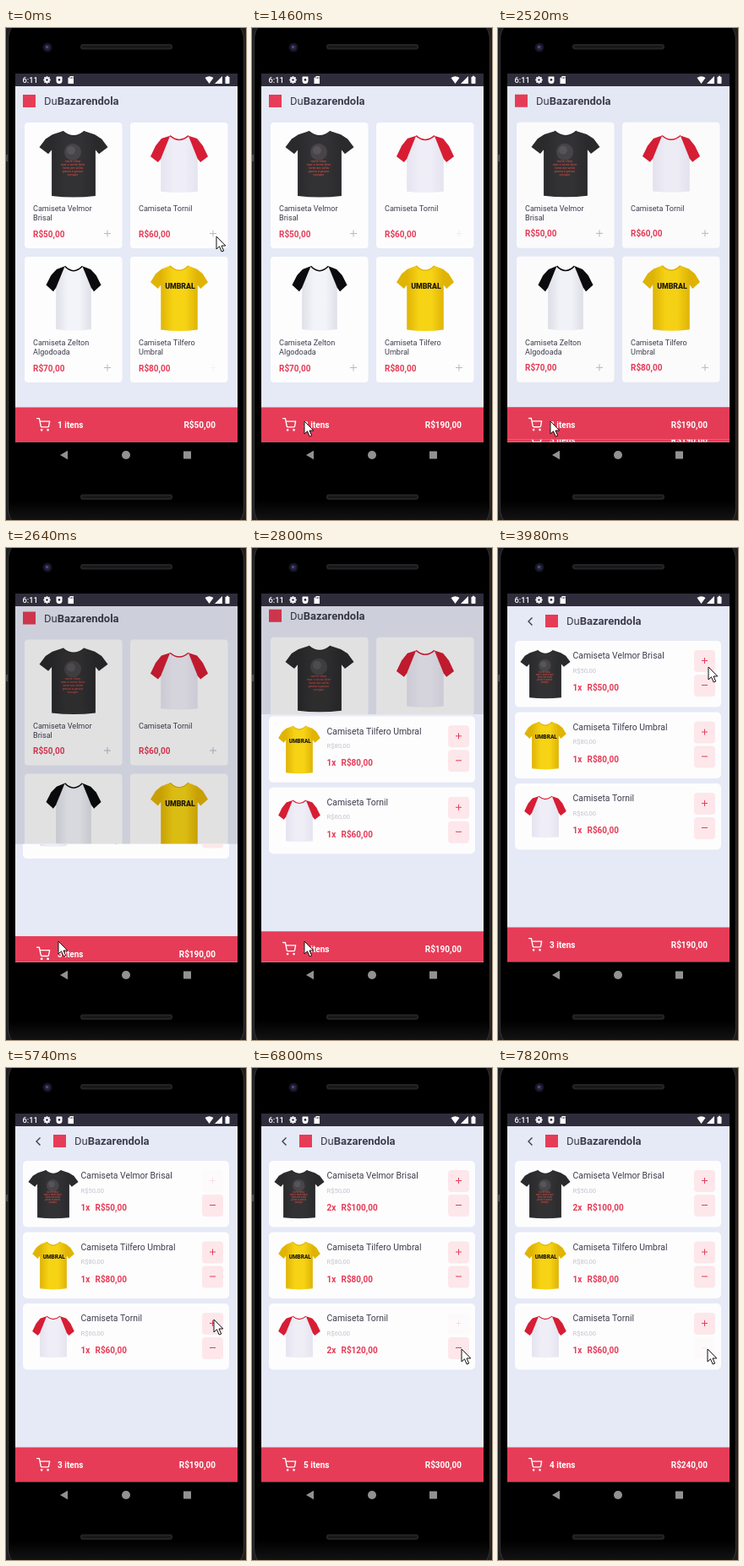
An HTML page with a canvas that plays this animation: 284x583 px, repeating every 8 s.

```html
<!DOCTYPE html>
<html lang="pt-BR">
<head>
<meta charset="utf-8">
<title>Loja</title>
<style>
html, body { margin: 0; width: 100%; height: 100%; overflow: hidden; background: #000; }
canvas { display: block; width: 284px; height: 583px; }
</style>
</head>
<body>
<canvas id="stage"></canvas>
<script>
const W = 284, H = 583, LOOP = 8000;
const STEP = 132.7; // the phone screen is refreshed at this pace
const RED = '#e63c57', INK = '#3d3d4d', BG = '#e6e9f6', CARD = '#fdfdfe';
const SCREEN = { x: 11, y: 54, w: 263, h: 436.5 };
const BRAND = ['Du', 'Bazarendola'];

const PRODUCTS = [
  { lines: ['Camiseta Velmor', 'Brisal'], price: 50,
    look: { w: 81, h: 79, drop: .25, body: '#323234', shade: '#2a2a2c', print: globePrint } },
  { lines: ['Camiseta Tornil'], price: 60,
    look: { w: 68, h: 68, drop: .37, body: '#efeef7', shade: '#e4e3ef', sleeve: '#d71d33' } },
  { lines: ['Camiseta Zelton', 'Algodoada'], price: 70,
    look: { w: 65, h: 77, drop: .3, body: '#f3f4f9', shade: '#dfe0e8', sleeve: '#0b0b0d' } },
  { lines: ['Camiseta Tilfero', 'Umbral'], price: 80,
    look: { w: 68, h: 78, drop: .26, body: '#f6d314', shade: '#e0b406', print: wordPrint } }
];
const ROWS = [0, 3, 1];

// Button presses: fades at "down", takes effect at "apply", recovers at "up"
const TAPS = [
  { id: 3, add: 1, down: -400, apply: 130, up: 60 },
  { id: 1, add: 1, down: 300, apply: 1180, up: 1440 },
  { id: 0, add: 1, down: 4900, apply: 5830, up: 6000 },
  { id: 1, add: 1, down: 6260, apply: 6500, up: 6900 },
  { id: 1, add: -1, down: 7600, apply: 7690, up: LOOP }
];
const HOME = { x: 249, y: 247 };
const MOVES = [
  { from: 500, to: 1300, x: 62, y: 466 },
  { from: 3300, to: 3870, x: 249, y: 141 },
  { from: 4230, to: 4500, x: 246, y: 298 },
  { from: 6100, to: 6420, x: 248, y: 333 }
];

const canvas = document.getElementById('stage');
const ctx = canvas.getContext('2d');
const dpr = window.devicePixelRatio || 1;
canvas.width = W * dpr;
canvas.height = H * dpr;

const mix = (a, b, u) => a + (b - a) * u;
const ramp = (t, a, b) => Math.min(1, Math.max(0, (t - a) / (b - a)));
const smooth = u => u * u * (3 - 2 * u);
const money = n => `R$${n},00`;

const quantity = (id, t) => TAPS.reduce(
  (n, tap) => n + (tap.id === id && t >= tap.apply ? tap.add : 0), id === 0 ? 1 : 0);
const alphaOf = (id, add, t) => TAPS
  .filter(tap => tap.id === id && tap.add === add)
  .reduce((a, { down, up }) => a * (1 - .88 * ramp(t, down, down + 150) * (1 - ramp(t, up, up + 250))), 1);

function box(x, y, w, h, r, fill) {
  ctx.fillStyle = fill;
  ctx.beginPath();
  ctx.roundRect(x, y, w, h, r);
  ctx.fill();
}
function disc(x, y, r, fill) {
  ctx.fillStyle = fill;
  ctx.beginPath();
  ctx.arc(x, y, r, 0, Math.PI * 2);
  ctx.fill();
}
function poly(points, fill) {
  ctx.beginPath();
  points.forEach(([x, y]) => ctx.lineTo(x, y));
  ctx.closePath();
  ctx.fillStyle = fill;
  ctx.fill();
}
function text(str, x, y, size, color, weight = 400, align = 'left') {
  ctx.font = `${weight} ${size}px Roboto, sans-serif`;
  ctx.fillStyle = color;
  ctx.textAlign = align;
  ctx.fillText(str, x, y);
  return ctx.measureText(str).width;
}
function moved(x, y, scale, draw) {
  ctx.save();
  ctx.translate(x, y);
  ctx.scale(scale, scale);
  draw();
  ctx.restore();
}
function faded(alpha, draw) {
  ctx.save();
  ctx.globalAlpha *= alpha;
  draw();
  ctx.restore();
}
function sign(x, y, r, color, plus) {
  ctx.strokeStyle = color;
  ctx.lineWidth = 1;
  ctx.beginPath();
  ctx.moveTo(x - r, y);
  ctx.lineTo(x + r, y);
  if (plus) { ctx.moveTo(x, y - r); ctx.lineTo(x, y + r); }
  ctx.stroke();
}

// T-shirt centred on the origin; "drop" is how far down the sleeves reach
function shirt({ w, h, drop, body, shade, sleeve, print }) {
  const arm = .18;
  const p = (u, v) => [(u - .5) * w, (v - .5) * h];
  const side = f => [
    p(f(.34), .01), p(f(.19), .06), p(f(.09), drop * .5), p(f(0), drop),
    p(f(.13), drop + .1), p(f(arm), drop + .04)
  ];
  const left = side(u => u), right = side(u => 1 - u);
  const fill = ctx.createLinearGradient(-w / 2, 0, w / 2, 0);
  [shade, body, body, shade].forEach((c, i) => fill.addColorStop(mix(arm, 1 - arm, i / 3), c));

  ctx.beginPath();
  left.forEach(q => ctx.lineTo(...q));
  ctx.lineTo(...p(arm, .98));
  ctx.quadraticCurveTo(...p(.5, 1.02), ...p(1 - arm, .98));
  [...right].reverse().forEach(q => ctx.lineTo(...q));
  ctx.quadraticCurveTo(...p(.5, .15), ...left[0]);
  ctx.fillStyle = fill;
  ctx.fill();

  if (sleeve) [left, right].forEach(s => poly(s, sleeve));
  ctx.strokeStyle = sleeve || shade;
  ctx.lineWidth = 1.5;
  ctx.beginPath();
  ctx.moveTo(...left[0]);
  ctx.quadraticCurveTo(...p(.5, .15), ...right[0]);
  ctx.stroke();
  if (print) print();
}
function globePrint() {
  disc(-1, -14, 10, '#474548');
  disc(-3, -16, 5, '#57545a');
  ['norte claro', 'mar e vento livre', 'terra em volta', 'passo a passo', 'sempre'].forEach((line, i) =>
    text(line, -1, -2 + i * 4, 3.8, '#b8453f', 700, 'center'));
}
function wordPrint() {
  text('UMBRAL', 1, -11, 8.8, '#1d1a10', 900, 'center');
}

function header(x) {
  box(x, 79, 15, 15, 0, RED);
  const w = text(BRAND[0], x + 25, 91, 13, INK);
  text(BRAND[1], x + 25 + w, 91, 13, INK, 700);
}

const trolley = new Path2D('M1 1h4l2.7 13.4a2 2 0 0 0 2 1.6h9.7a2 2 0 0 0 2-1.6L23 6H6M10 21a1 1 0 1 1-2 0a1 1 0 1 1 2 0M21 21a1 1 0 1 1-2 0a1 1 0 1 1 2 0');

function cartBar(t) {
  let count = 0, total = 0;
  PRODUCTS.forEach(({ price }, id) => {
    count += quantity(id, t);
    total += quantity(id, t) * price;
  });
  box(11, 449.5, 263, 60, 0, RED);
  moved(36, 462, .68, () => {
    ctx.strokeStyle = '#fff';
    ctx.lineWidth = 2;
    ctx.lineCap = ctx.lineJoin = 'round';
    ctx.stroke(trolley);
  });
  text(`${count} itens`, 61, 474, 10, '#fff', 700);
  text(money(total), 248, 474, 10, '#fff', 700, 'right');
}

function shopScreen(t) {
  box(11, 54, 263, 460, 0, BG);
  header(20);
  PRODUCTS.forEach(({ lines, price, look }, id) => {
    const x = 22 + id % 2 * 125, y = 112 + (id >> 1) * 159;
    box(x, y, 115.5, 149, 4, CARD);
    moved(x + 58, y + 49, 1, () => shirt(look));
    lines.forEach((line, n) => text(line, x + 10, y + 105 + n * 11, 9.1, INK));
    text(money(price), x + 10, y + 135.5, 10, RED, 700);
    faded(alphaOf(id, 1, t), () => sign(x + 98, y + 131.5, 4, '#b7b7c6', true));
  });
  cartBar(t);
}

function stepper(y, id, add, t) {
  faded(alphaOf(id, add, t), () => {
    box(232, y, 25, 26, 4, '#fde7ea');
    sign(244.5, y + 12.5, 3.5, RED, add > 0);
  });
}

function cartScreen(t) {
  box(11, 54, 263, 460, 0, BG);
  ctx.strokeStyle = INK;
  ctx.lineWidth = 1.4;
  ctx.beginPath();
  ctx.moveTo(40.5, 82.5);
  ctx.lineTo(36, 87);
  ctx.lineTo(40.5, 91.5);
  ctx.stroke();
  header(56);
  ROWS.forEach((id, row) => {
    const { lines, price, look } = PRODUCTS[id], y = 110 + row * 84.5, n = quantity(id, t);
    box(20, y, 244, 78.5, 5, CARD);
    moved(56, y + 39.5, .73, () => shirt(look));
    text(lines.join(' '), 88.5, y + 21.3, 10.4, INK);
    text(money(price), 88.5, y + 37.5, 7.6, '#c4c2cd');
    text(`${n}x`, 88.5, y + 59, 10, RED, 700);
    text(money(n * price), 105.5, y + 59, 10, RED, 700);
    stepper(y + 11, id, 1, t);
    stepper(y + 40, id, -1, t);
  });
  cartBar(t);
}

// The cart page is revealed from the bottom while both pages drift up
function screens(t) {
  const { x, y, w, h } = SCREEN;
  const p = Math.sin(ramp(t, 2515, 3035) * Math.PI / 2);
  ctx.save();
  ctx.beginPath();
  ctx.rect(x, y, w, h);
  ctx.clip();
  if (p < 1) {
    moved(0, -.0196 * h * p, 1, () => shopScreen(t));
    box(x, y, w, h, 0, `rgba(0,0,0,${Math.min(.11, p * .35)})`);
  }
  if (p > 0) {
    ctx.beginPath();
    ctx.rect(x, y + h * (1 - p ** 1.27), w, h);
    ctx.clip();
    moved(0, .041 * h * (1 - p), 1, () => cartScreen(t));
  }
  ctx.restore();
}

function phone() {
  const shell = ctx.createLinearGradient(0, 560, 0, H);
  shell.addColorStop(0, '#000');
  shell.addColorStop(1, '#131314');
  box(0, 0, W, H, 0, '#1f1f21');
  box(2.5, -14, 279, 611, 28, shell);
  ctx.strokeStyle = '#353538';
  ctx.lineWidth = 1;
  ctx.stroke();
  box(0, 150, 2, 8, 0, '#4a4a4e');
  for (const y of [19, 552.5]) {
    box(88, y, 109, 6.5, 3, '#242426');
    box(90, y + 2, 105, 2.5, 1, '#171719');
  }
  disc(49, 23, 5.5, '#15151f');
  disc(49, 23, 3.2, '#25254a');
  disc(48.5, 22.5, 1.3, '#5457a0');
}

function statusBar() {
  const c = '#fff', dark = '#2f2d3b';
  box(11, 54, 263, 15, 0, dark);
  text('6:11', 19.5, 65, 9.3, c, 500);
  for (let i = 0; i < 8; i++) {
    const a = i * Math.PI / 4;
    disc(48.5 + Math.cos(a) * 3.4, 61.5 + Math.sin(a) * 3.4, 1, c);
  }
  disc(48.5, 61.5, 3.2, c);
  disc(48.5, 61.5, 1.3, dark);
  box(59.5, 57.5, 7, 8.5, [1, 1, 4, 4], c);
  disc(63, 61.4, 1.4, dark);
  poly([[76, 57], [80, 57], [80, 66], [73.5, 66], [73.5, 59.5]], c);
  for (let i = 0; i < 3; i++) box(75.6 + i * 1.5, 58.2, .7, 1.8, 0, dark);
  ctx.fillStyle = c;
  ctx.beginPath();
  ctx.moveTo(240.5, 66);
  ctx.arc(240.5, 66, 8.5, -Math.PI * .7, -Math.PI * .3);
  ctx.fill();
  poly([[256, 57], [256, 66], [247, 66]], c);
  box(259.5, 57.8, 5, 8.2, .7, c);
  box(261, 56.8, 2, 1.5, 0, c);
}

function navBar() {
  const c = '#929292';
  poly([[64, 506], [73, 500.8], [73, 511.2]], c);
  disc(142, 506, 5, c);
  box(210, 501.5, 9, 9, .5, c);
}

function pointer(t) {
  const pos = MOVES.reduce((at, { from, to, x, y }) => {
    const u = smooth(ramp(t, from, to));
    return { x: mix(at.x, x, u), y: mix(at.y, y, u) };
  }, HOME);
  moved(pos.x, pos.y, 1, () => {
    poly([[0, 0], [0, 15], [3.5, 11.8], [6.2, 18], [8.7, 17], [6, 11], [10.8, 11]], '#fff');
    ctx.strokeStyle = '#111';
    ctx.lineWidth = 1;
    ctx.stroke();
  });
}

function render(time) {
  const t = Math.floor((time + 15) / STEP) * STEP;
  ctx.setTransform(dpr, 0, 0, dpr, 0, 0);
  phone();
  screens(t);
  statusBar();
  navBar();
  pointer(t);
}

const start = performance.now();
function loop() {
  render((performance.now() - start) % LOOP);
  requestAnimationFrame(loop);
}
loop();
</script>
</body>
</html>
```
